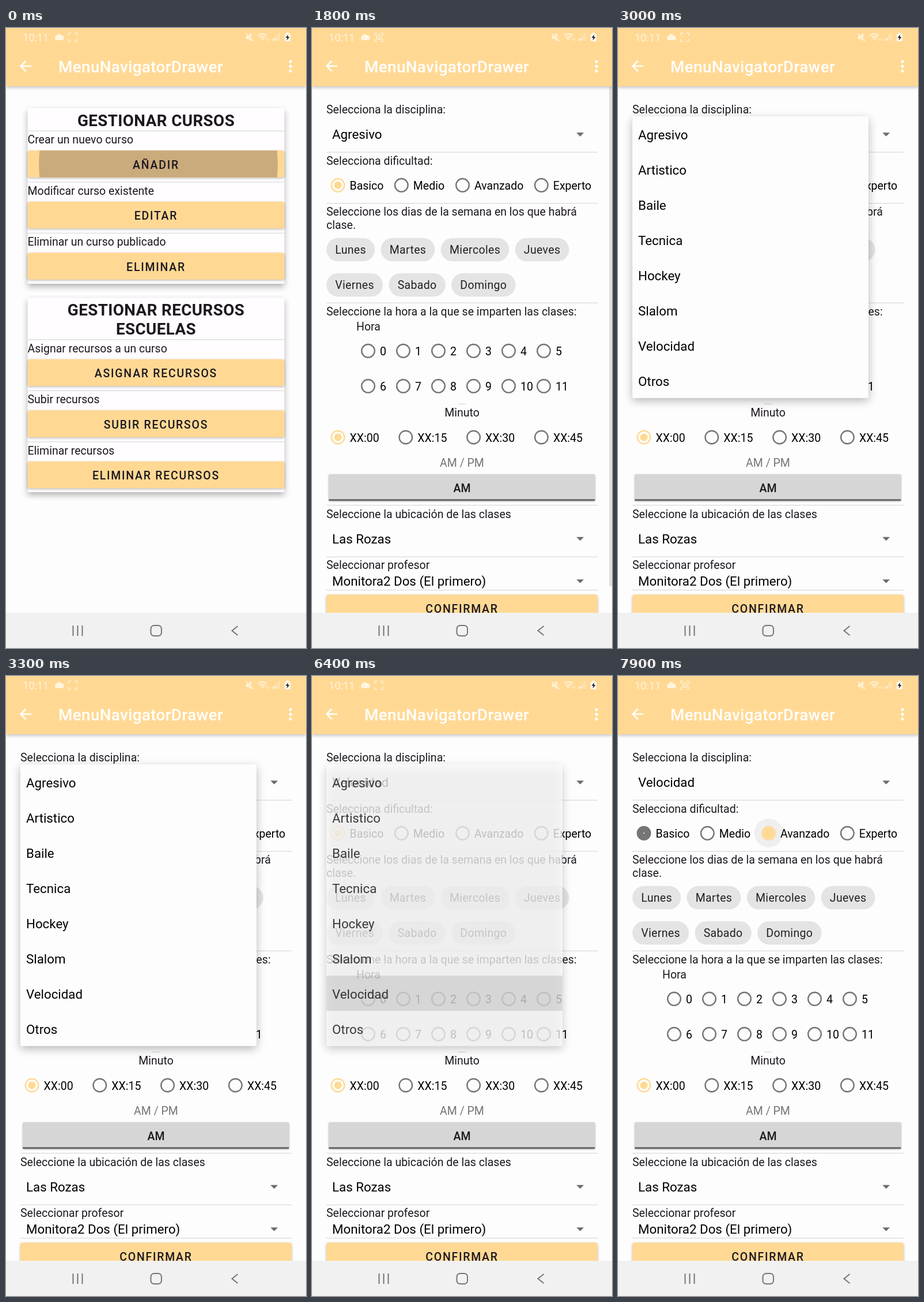
Recreate the animation shown at these times as an HTML page with a canvas. Size 521 px wide and 1074 px high, loop 8000 ms.

```html
<!DOCTYPE html>
<html lang="es">
<head>
<meta charset="utf-8">
<title>Gestionar cursos</title>
<style>
  html, body { margin: 0; width: 100%; height: 100%; overflow: hidden; background: #fdfdfd; }
  canvas { display: block; width: 521px; height: 1074px; }
</style>
</head>
<body>
<canvas id="stage" width="521" height="1074"></canvas>
<script>
const ctx = document.getElementById('stage').getContext('2d');
const LOOP = 8000;
const YELLOW = '#ffd994', PAGE = '#fdfdfd', INK = '#1d1820', GREY = '#757575';
const SMALL = 19.5, MEDIUM = 22.3, LARGE = 27.86;
const DISCIPLINES = ['Agresivo', 'Artistico', 'Baile', 'Tecnica', 'Hockey', 'Slalom', 'Velocidad', 'Otros'];

const progress = (t, from, to) => Math.min(1, Math.max(0, (t - from) / (to - from)));
const easeOut = p => 1 - (1 - p) ** 2;

// y is the middle of the capital letters
function text(str, x, y, { size = SMALL, weight = 400, color = INK, align = 'left', spacing = 0 } = {}) {
  ctx.font = `${weight} ${size}px Roboto, sans-serif`;
  ctx.letterSpacing = spacing + 'px';
  ctx.textAlign = align;
  ctx.fillStyle = color;
  ctx.fillText(str, x, y + size * 0.355);
}

function box(x, y, w, h, color, radius = 0, shadow) {
  ctx.save();
  if (shadow) {
    ctx.shadowColor = `rgba(0,0,0,${shadow.alpha})`;
    ctx.shadowBlur = shadow.blur;
    ctx.shadowOffsetY = shadow.y;
  }
  ctx.fillStyle = color;
  ctx.beginPath();
  ctx.roundRect(x, y, w, h, radius);
  ctx.fill();
  ctx.restore();
}

function disc(x, y, r, color) {
  ctx.fillStyle = color;
  ctx.beginPath();
  ctx.arc(x, y, r, 0, 7);
  ctx.fill();
}

function stroke(path, color, width) {
  ctx.strokeStyle = color;
  ctx.lineWidth = width;
  ctx.stroke(new Path2D(path));
}

function fill(path, color) {
  ctx.fillStyle = color;
  ctx.fill(new Path2D(path));
}

function clipped(x, y, w, h, draw) {
  ctx.save();
  ctx.beginPath();
  ctx.rect(x, y, w, h);
  ctx.clip();
  draw();
  ctx.restore();
}

function withAlpha(alpha, draw) {
  if (alpha <= 0) return;
  ctx.save();
  ctx.globalAlpha = alpha;
  draw();
  ctx.restore();
}

const divider = (x, y, w) => box(x, y - 0.6, w, 1.3, '#dadada');

function button(label, x, y, w, ripple = 0) {
  box(x, y, w, 46.5, YELLOW, 4, { alpha: 0.28, blur: 4, y: 1.5 });
  if (ripple) clipped(x, y, w, 46.5, () => disc(264.5, y + 24, ripple, '#caab7b'));
  text(label, x + w / 2, y + 24.5, { weight: 500, align: 'center', spacing: 1.74 });
}

// Unselected ring closes to a full disc, then opens into ring and dot
function radio(x, y, label, selected = 0, color = selected ? YELLOW : GREY) {
  ctx.fillStyle = color;
  ctx.beginPath();
  ctx.arc(x, y, 12.5, 0, 7);
  if (selected < 0.5) {
    const hole = 10.1 * (1 - selected * 2);
    ctx.moveTo(x + hole, y);
    ctx.arc(x, y, hole, 0, 7);
  } else {
    const gap = selected * 2 - 1;
    const inner = 10.1 - 3.6 * gap;
    ctx.moveTo(x + 10.1, y);
    ctx.arc(x, y, 10.1, 0, 7);
    ctx.moveTo(x + inner, y);
    ctx.arc(x, y, inner, 0, 7);
  }
  ctx.fill('evenodd');
  text(label, x + 20.5, y + 1, { color: '#000' });
}

function card(y, height, titles, rows, ripple) {
  box(37.5, y, 446, height, '#fffdff', 2, { alpha: 0.3, blur: 11, y: 5 });
  titles.forEach((title, i) => text(title, 260.5, y + 21 + 33 * i,
    { size: LARGE, weight: 700, align: 'center', spacing: 0.35 }));
  const first = y + 6.3 + 33 * titles.length;
  rows.forEach(([label, action], i) => {
    const top = first + 88.5 * i;
    divider(37.5, top, 446);
    text(label, 37.5, top + 15);
    button(action, 37.5, top + 34, 446, i ? 0 : ripple);
  });
}

function menuScreen(t) {
  card(139, 304, ['GESTIONAR CURSOS'], [
    ['Crear un nuevo curso', 'AÑADIR'],
    ['Modificar curso existente', 'EDITAR'],
    ['Eliminar un curso publicado', 'ELIMINAR']
  ], 207 + 0.4 * t);
  card(467.5, 336.5, ['GESTIONAR RECURSOS', 'ESCUELAS'], [
    ['Asignar recursos a un curso', 'ASIGNAR RECURSOS'],
    ['Subir recursos', 'SUBIR RECURSOS'],
    ['Eliminar recursos', 'ELIMINAR RECURSOS']
  ], 0);
}

function spinner(value, y) {
  text(value, 35, y, { size: MEDIUM, color: '#000' });
  fill(`M459.3 ${y - 3.2}h12.8l-6.4 6.4z`, '#6c6c6c');
}

function chips(labels, y) {
  let x = 25;
  for (const label of labels) {
    ctx.font = `400 ${SMALL}px Roboto, sans-serif`;
    ctx.letterSpacing = '0.35px';
    const w = ctx.measureText(label).width + 30.4;
    box(x, y - 20.2, w, 40.5, '#e4e4e4', 20.2);
    text(label, x + 15.2, y, { spacing: 0.35, color: '#222' });
    x += w + 10.3;
  }
}

function formScreen(t) {
  box(0, 101, 521, 913, PAGE);

  text('Selecciona la disciplina:', 25, 141);
  if (t > 1800 && t < 2300) disc(466, 184, 24.7 * easeOut(progress(t, 1780, 2000)), '#e8e8e8');
  spinner(t < 6300 ? 'Agresivo' : 'Velocidad', 184.5);
  divider(25, 215, 471);

  text('Selecciona dificultad:', 25, 230);
  const change = progress(t, 7680, 8080);
  if (t >= 7500) disc(261.5, 272, 25 * easeOut(progress(t, 7450, 7750)), '#efefef');
  radio(45, 272.3, 'Basico', 1 - change, change ? GREY : YELLOW);
  radio(155.3, 272.3, 'Medio');
  radio(261.5, 272.3, 'Avanzado', change);
  radio(398.3, 272.3, 'Experto');
  divider(25, 303.5, 471);

  text('Seleccione los dias de la semana en los que habrá', 25, 318.5);
  text('clase.', 25, 341.5);
  chips(['Lunes', 'Martes', 'Miercoles', 'Jueves'], 384);
  chips(['Viernes', 'Sabado', 'Domingo'], 445);
  divider(25, 476, 471);

  text('Seleccione la hora a la que se imparten las clases:', 25, 491);
  text('Hora', 77, 517);
  for (let hour = 0; hour < 12; hour++)
    radio(97.5 + 61 * (hour % 6), hour < 6 ? 559.3 : 620.3, String(hour));
  divider(254, 651.3, 13);
  text('Minuto', 260.5, 666, { align: 'center' });
  ['00', '15', '30', '45'].forEach((minute, i) =>
    radio(45 + 117.8 * i, 709, 'XX:' + minute, i ? 0 : 1));

  text('AM / PM', 260.5, 753.5, { align: 'center', color: GREY });
  box(29, 773, 462.5, 46, '#d6d6d6', 2, { alpha: 0.3, blur: 3, y: 1 });
  box(29, 816.3, 462.5, 2.7, '#616161', 1);
  text('AM', 260.5, 797, { weight: 500, align: 'center' });
  divider(25, 826.5, 471);

  text('Seleccione la ubicación de las clases', 25, 842);
  spinner('Las Rozas', 885);
  divider(25, 916, 471);
  text('Seleccionar profesor', 25, 930.5);
  spinner('Monitora2 Dos (El primero)', 958.5);
  divider(25, 973.5, 471);
  button('CONFIRMAR', 25, 981.5, 471);

  withAlpha(1 - progress(t, 1650, 1900), () => box(516, 101, 5, 866, '#b3b3b3'));
}

function dropdown(t) {
  if (t < 2060 || t >= 6600) return;
  const open = progress(t, 2060, 2272);
  const x = 25 + 24 * (1 - open), y = 153, w = 410, h = 488 * open;
  const alpha = t < 6300 ? Math.min(1, open * 2) : 1 - progress(t, 6300, 6600) ** 1.3;
  withAlpha(alpha, () => {
    box(x, y, w, h, PAGE, 2.5, { alpha: 0.28, blur: 16, y: 5 });
    clipped(x, y, w, h, () => {
      const shift = (h - 488) / 2;
      const press = progress(t, 5750, 6050);
      if (press) clipped(25, 519, w, 61, () => disc(230, 549, 215 * easeOut(press), 'rgba(0,0,0,.14)'));
      DISCIPLINES.forEach((name, i) =>
        text(name, x + 10, 184.7 + 61 * i + shift, { size: MEDIUM, color: '#000' }));
    });
  });
}

function statusBar(t) {
  const pale = '#fff4df';
  text('10:11', 29, 16.5, { size: 18.2, color: pale });
  fill('M87 21a4 4 0 0 1 0-7a5 5 0 0 1 9-1a4 4 0 0 1 1 8z', pale);
  stroke('M109 13v-4h4M119 9h4v4M123 19v4h-4M113 23h-4v-4', pale, 1.3);
  if (t % 1000 >= 500) {
    stroke('M112 13.5h2l1-1.5h3l1 1.5h2v6h-9z', pale, 1.2);
    disc(116.5, 16.5, 1.5, pale);
  }
  fill('M417 13h4l5-4v14l-5-4h-4z', pale);
  stroke('M416 9l14 14', YELLOW, 3);
  stroke('M416 9l14 14', pale, 1.5);
  stroke('M438 13q7.5-6 15 0M440.5 16.5q5-4 10 0M443 19.5q2.5-2 5 0', pale, 1.8);
  stroke('M453 18v4M456 18v4', pale, 1.2);
  stroke('M463.5 22v-3M467 22v-5', pale, 2);
  withAlpha(0.5, () => stroke('M470.5 22v-9M474 22v-13', pale, 2));
  box(484, 10, 10, 13, '#fffaf0', 2);
  box(487, 8, 4, 3, '#fffaf0');
  fill('M490 11.5l-4.5 5.5h3l-1 4.5l5-6h-3z', '#222');
}

function chrome(t) {
  box(0, 0, 521, 101, YELLOW, 0, { alpha: 0.25, blur: 6, y: 2 });
  statusBar(t);
  stroke('M44 66H26M34.5 57l-9 9l9 9', '#fff', 2.5);
  text('MenuNavigatorDrawer', 91, 67.5, { size: LARGE, weight: 500, color: '#fff', spacing: 0.35 });
  [58, 66.3, 74.6].forEach(y => disc(494, y, 2.6, '#fff'));

  box(0, 1013, 521, 61, '#f1f1f1');
  stroke('M116.5 1035v18M124.5 1035v18M132.5 1035v18', GREY, 2);
  stroke('M402.5 1036l-10 8l10 8', GREY, 2);
  ctx.beginPath();
  ctx.roundRect(251.5, 1035, 18.5, 18, 5.5);
  ctx.stroke();
}

function draw(t) {
  box(0, 0, 521, 1074, PAGE);
  if (t < 450) menuScreen(t);
  withAlpha(progress(t, 150, 450), () => formScreen(t));
  dropdown(t);
  chrome(t);
}

const start = performance.now();
function tick() {
  draw((performance.now() - start) % LOOP);
  requestAnimationFrame(tick);
}
tick();
</script>
</body>
</html>
```
